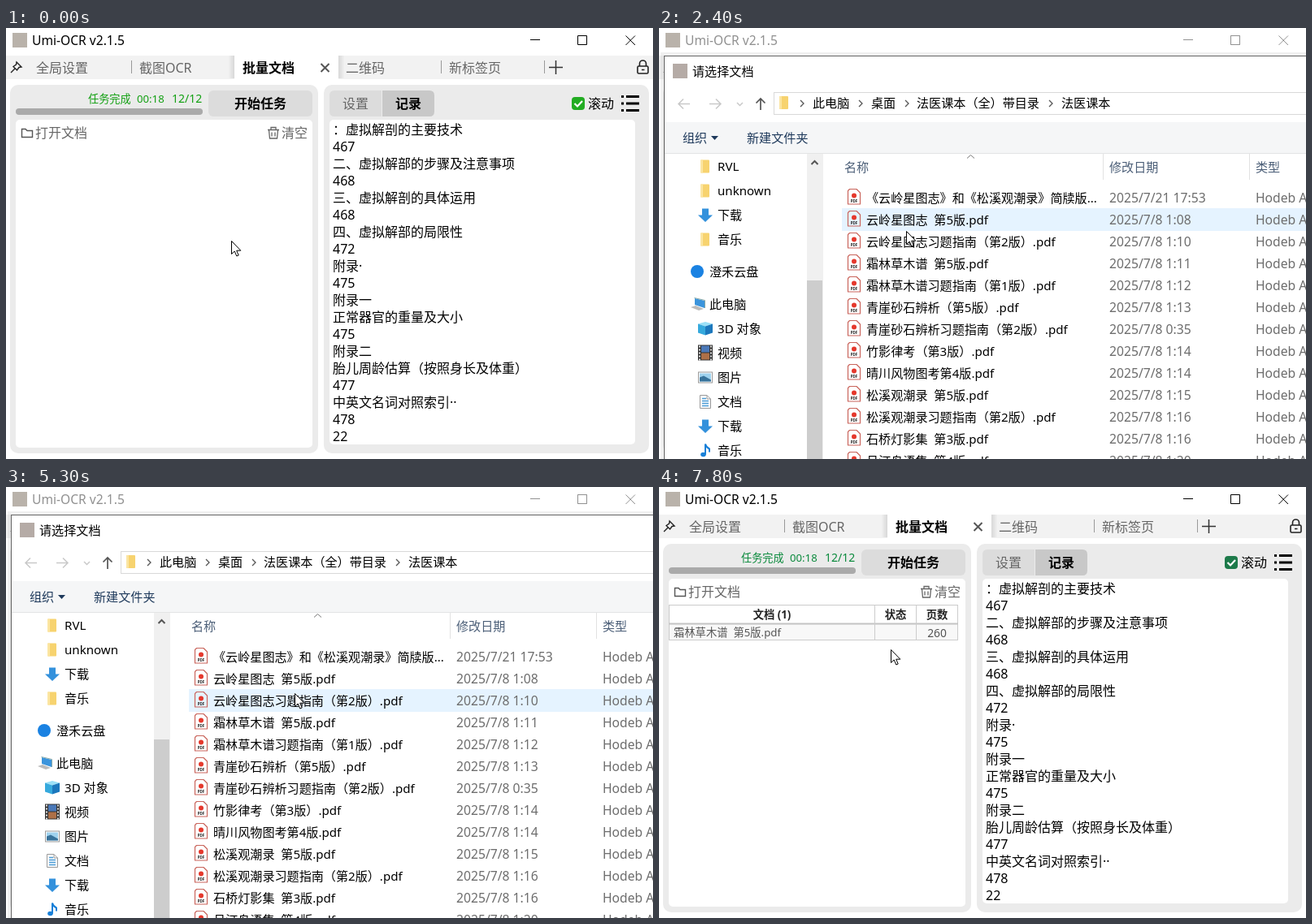
An HTML page for the animation above (8 s loop, 796x531 px).

```html
<!DOCTYPE html>
<html lang="zh-CN">
<head>
<meta charset="utf-8">
<title>批量文档</title>
<style>
html, body { margin: 0; width: 100%; height: 100%; overflow: hidden; background: #fff; }
svg { display: block; width: 796px; height: 531px; }
text { font-family: "Noto Sans", "Noto Sans CJK SC", "Noto Sans CJK", sans-serif; white-space: pre; }
</style>
</head>
<body>
<svg id="stage" viewBox="0 0 796 531" xmlns="http://www.w3.org/2000/svg"></svg>
<script>
// Markup helpers; text is placed by its vertical centre, on a whole-pixel baseline.
const text = (x, cy, str, size = 16, fill = '#000', extra = '') =>
  `<text x="${x}" y="${Math.round(cy + size * 0.37)}" font-size="${size}" fill="${fill}" ${extra}>${str}</text>`;
const rect = (x, y, w, h, fill, r = 0, extra = '') =>
  `<rect x="${x}" y="${y}" width="${w}" height="${h}" rx="${r}" fill="${fill}" ${extra}/>`;
const line = (d, color, width = 1, extra = '') =>
  `<path d="${d}" fill="none" stroke="${color}" stroke-width="${width}" ${extra}/>`;
const shape = (d, fill) => `<path d="${d}" fill="${fill}"/>`;
const group = (id, body) => `<g id="${id}">${body}</g>`;
const folder = (x, y) => rect(x, y, 11, 16, '#f7d36f', 1) + rect(x, y, 3, 16, '#fbe5a1', 1);
const BOLD = 'font-weight="700"';
const MID = 'text-anchor="middle"';

const log = ['：虚拟解剖的主要技术', '467', '二、虚拟解部的步骤及注意事项', '468', '三、虚拟解剖的具体运用', '468',
  '四、虚拟解部的局限性', '472', '附录·', '475', '附录一', '正常器官的重量及大小', '475', '附录二',
  '胎儿周龄估算（按照身长及体重）', '477', '中英文名词对照索引··', '478', '22'];

const files = [
  ['《云岭星图志》和《松溪观潮录》简牍版...', '7/21 17:53'],
  ['云岭星图志  第5版.pdf', '7/8 1:08'],
  ['云岭星图志习题指南（第2版）.pdf', '7/8 1:10'],
  ['霜林草木谱  第5版.pdf', '7/8 1:11'],
  ['霜林草木谱习题指南（第1版）.pdf', '7/8 1:12'],
  ['青崖砂石辨析（第5版）.pdf', '7/8 1:13'],
  ['青崖砂石辨析习题指南（第2版）.pdf', '7/8 0:35'],
  ['竹影律考（第3版）.pdf', '7/8 1:14'],
  ['晴川风物图考第4版.pdf', '7/8 1:14'],
  ['松溪观潮录  第5版.pdf', '7/8 1:15'],
  ['松溪观潮录习题指南（第2版）.pdf', '7/8 1:16'],
  ['石桥灯影集  第3版.pdf', '7/8 1:16'],
  ['月汀鸟语集  第4版.pdf', '7/8 1:20'],
];
const ROW = 27, FIRST_ROW = 195;

function titleBar() {
  return group('titleBar',
    text(32, 15.5, 'Umi-OCR v2.1.5', 15.6) +
    line('M645 14.5H657M703.5 9.5H714.5V20.5H703.5ZM762.5 9.5L774 21M774 9.5L762.5 21', '#000'));
}

function tabs() {
  const shade = (x, from, to) => Array.from({ length: 8 }, (_, i) =>
    rect(x + i, 34, 1, 28, '#000', 0, `opacity="${(from + (to - from) * i / 7).toFixed(3)}"`)).join('');
  return rect(0, 34, 796, 29, '#f2f2f2') +
    shade(273, 0, .1) + shade(409, .1, 0) + rect(281, 34, 128, 29, '#fff') +
    line('M154.5 40V56M535.5 40V56M662.5 40V56', '#999') +
    text(37, 49, '全局设置', 16, '#666') + text(164, 49, '截图OCR', 16, '#666') +
    text(291, 49, '批量文档', 16, '#000', BOLD) + text(418, 49, '二维码', 16, '#666') +
    text(545, 49, '新标签页', 16, '#666') +
    line('M387.5 44L397.5 54M397.5 44L387.5 54', '#555', 2) +
    line('M668 48.5H685M676.5 40V57', '#333', 1.5) +
    line('M13 42L19 48L16 48.5L13.5 52L9 47.5L12.5 45ZM11 50L6 55', '#222', 1.4) +
    rect(777, 47, 13, 9, 'none', 1.5, 'stroke="#222" stroke-width="1.6"') +
    line('M779.5 47V44A4 4 0 0 1 787.5 44V47M782 51.5H785.5', '#222', 1.6);
}

function leftPanel() {
  return rect(5, 70, 379, 454, '#ebebeb', 10) +
    group('progress', text(101, 87, '任务完成', 13.2, 'currentColor') +
      text(161, 87, '00:18', 13.2, 'currentColor') + text(204, 87, '12/12', 14, 'currentColor')) +
    rect(12, 99, 230, 8, '#aaa', 4) + rect(249, 77, 128, 32, '#dcdcdc', 6) +
    text(313, 93.5, '开始任务', 16, '#000', `${BOLD} ${MID}`) +
    rect(12, 113, 365, 404, '#fff', 5) +
    rect(14, 115, 90, 30, '#dcdcdc', 5, 'id="openHover"') +
    line('M19.5 124.5H24L26 126.5H32.5V134.5H19.5Z', '#555', 1.4) + text(36, 129.5, '打开文档', 16, '#666') +
    line('M322 125.5H336M326 125V122.5H332V125M323.5 126L324.5 136H333.5L334.5 126M327 128.5V133.5M331 128.5V133.5', '#666', 1.3) +
    text(339, 129.5, '清空', 16, '#666') +
    group('table',
      rect(12.5, 145.5, 355, 43, '#fff', 0, 'stroke="#ccc"') + rect(13, 169, 354, 19, '#f8f8f8') +
      line('M12 168.5H368', '#c4c4c4', 2) + line('M265.5 145V189M316.5 145V189', '#ccc') +
      text(139, 157.5, '文档 (1)', 13.3, '#222', `${BOLD} ${MID}`) +
      text(291, 157.5, '状态', 13.3, '#222', `${BOLD} ${MID}`) +
      text(342, 157.5, '页数', 13.3, '#222', `${BOLD} ${MID}`) +
      text(18, 179.5, '霜林草木谱  第5版.pdf', 13.3, '#555') + text(342, 179.5, '260', 13.8, '#555', MID));
}

function rightPanel() {
  return rect(391, 70, 400, 454, '#ebebeb', 10) +
    shape('M404 77H462V109H404Q398 109 398 103V83Q398 77 404 77Z', '#dcdcdc') +
    shape('M463 77H521Q527 77 527 83V103Q527 109 521 109H463Z', '#c8c8c8') +
    text(414, 93.5, '设置', 16, '#666') + text(479, 93.5, '记录', 16, '#000', BOLD) +
    rect(696, 85, 16, 16, '#22ac22', 4, 'id="check"') + line('M699.5 93L703 96.5L709 90', '#fff', 2.2) +
    text(716, 93.5, '滚动', 16) +
    line('M757 84.5H760M763 84.5H779M757 93H760M763 93H779M757 101.5H760M763 101.5H779', '#000', 3) +
    rect(398, 113, 376, 400, '#fff', 5) +
    log.map((s, i) => text(402, 125.5 + i * 20.97, s)).join('');
}

const icons = {
  folder: y => folder(51, y - 8),
  page: y => line(`M50.5 ${y - 8}H59L63.5 ${y - 3.5}V${y + 8}H50.5ZM59 ${y - 8}V${y - 3.5}H63.5`, '#999'),
  down: y => shape(`M53 ${y - 8}H61V${y}H66L57 ${y + 8.5}L48 ${y}H53Z`, '#3391dc'),
  cloud: y => `<circle cx="47" cy="${y - 1}" r="8" fill="#1a82e2"/>`,
  pc: y => shape(`M44 ${y - 7}L56 ${y - 4}V${y + 5}L44 ${y + 1}Z`, '#3b94dc') +
    line(`M43.5 ${y - 7.5}L56.5 ${y - 4.5}V${y + 5}`, '#8aa') + shape(`M39 ${y + 4}L45 ${y + 2}L55 ${y + 6}L49 ${y + 8}Z`, '#bbb'),
  cube: y => shape(`M48 ${y - 6}L57 ${y - 8.5}L66 ${y - 6}L57 ${y - 3}Z`, '#9be0f7') +
    shape(`M48 ${y - 6}L57 ${y - 3}V${y + 8}L48 ${y + 5}Z`, '#36a9dd') + shape(`M66 ${y - 6}L57 ${y - 3}V${y + 8}L66 ${y + 5}Z`, '#1c78bd'),
  film: y => rect(48, y - 10, 18, 19, '#333') + rect(52, y - 9, 10, 8, '#4a78b8') + rect(52, y, 10, 8, '#ad7048') +
    line(`M50 ${y - 9}V${y + 9}M64 ${y - 9}V${y + 9}`, '#ddd', 2, 'stroke-dasharray="2"'),
  picture: y => rect(48.5, y - 6.5, 17, 13, '#fff', 0, 'stroke="#999"') + rect(50, y - 5, 14, 10, '#9fd2ee') +
    shape(`M50 ${y + 5}V${y}L55 ${y - 2}L64 ${y + 3}V${y + 5}Z`, '#38739b'),
  doc: y => icons.page(y) + line(`M53 ${y - 4}H58M53 ${y - 1}H61M53 ${y + 2}H61M53 ${y + 5}H61`, '#4a9bd5', 1.3),
  note: y => line(`M57 ${y + 5}V${y - 8}Q58 ${y - 4} 62 ${y - 2}V${y + 2}`, '#1980d8', 2) +
    `<ellipse cx="54.5" cy="${y + 5}" rx="3.3" ry="2.7" fill="#1980d8"/>`,
};

function sidebar() {
  const places = [['RVL', 'folder'], ['unknown', 'folder'], ['下载', 'down'], ['音乐', 'folder']];
  const devices = [['3D 对象', 'cube'], ['视频', 'film'], ['图片', 'picture'], ['文档', 'doc'], ['下载', 'down'], ['音乐', 'note']];
  const label = (y, s, x = 72) => text(x, y, s, 15.1);
  const placeIcons = pick => places.map((p, i) => icons[pick(p)](170.5 + i * 30)).join('');
  return places.map(([s], i) => label(170.5 + i * 30, s)).join('') +
    group('pendingIcons', placeIcons(() => 'page')) + group('placeIcons', placeIcons(p => p[1])) +
    icons.cloud(301) + label(300.5, '澄禾云盘', 62) + icons.pc(340) + label(340.5, '此电脑', 62) +
    devices.map(([s, icon], i) => icons[icon](370.5 + i * 30) + label(370.5 + i * 30, s)).join('') +
    rect(182, 155, 20, 380, '#f0f0f0') + rect(182, 311, 19, 224, '#cdcdcd') +
    line('M187.5 168L191.5 164L195.5 168', '#555', 2);
}

function fileRow([name, date], i) {
  const y = 209.5 + i * ROW;
  return line(`M234.5 ${y - 11}H243L247.5 ${y - 6.5}V${y + 7.5}H232.5V${y - 9}Z`, '#c9655c', 1.2, 'stroke-linejoin="round"') +
    `<circle cx="240" cy="${y - 3}" r="3" fill="#e5382c"/>` + text(240, y + 4, 'PDF', 4.5, '#222', `${BOLD} ${MID}`) +
    text(255, y, name, 15.1) + text(554, y, '2025/' + date, 15.7, '#6d6d6d') + text(734, y, 'Hodeb A', 15.7, '#6d6d6d');
}

function dialog() {
  const crumbs = [[189, '此电脑'], [261, '桌面'], [317, '法医课本（全）带目录'], [495, '法医课本']];
  const chevrons = [176, 248, 305, 482].map(x => `M${x - 2} 89L${x + 2} 93L${x - 2} 97`).join('');
  return rect(4.5, 32.5, 900, 600, 'none', 0, 'stroke="#000" stroke-opacity=".06" stroke-width="5"') +
    rect(6.5, 34.5, 900, 600, '#fff', 0, 'stroke="#666"') +
    rect(17, 44, 18, 18, '#b5aba6', 0, 'id="dialogIcon"') + text(41, 53.5, '请选择文档', 15.1, '#000', 'id="dialogTitle"') +
    rect(7, 116, 900, 38, '#f5f6f7') + line('M7 154.5H900', '#e3e4e5') +
    group('navigation',
      line('M38 93.5H24M30 87.5L24 93.5L30 99.5M62 93.5H76M70 87.5L76 93.5L70 99.5M96 92L99.5 95.5L103 92', '#c9c9c9', 1.5) +
      line('M125 101V87M119.5 92.5L125 87L130.5 92.5', '#555', 1.7) +
      rect(141.5, 79.5, 700, 27, '#fff', 0, 'stroke="#d9d9d9"') + folder(148, 84) +
      line(chevrons, '#555', 1.3) + crumbs.map(([x, s]) => text(x, 92.5, s, 15.1)).join('') +
      text(29, 135, '组织', 15.1, '#1e395b') + shape('M64 133H73L68.5 138Z', '#1e395b') +
      text(108, 135, '新建文件夹', 15.1, '#1e395b')) +
    sidebar() +
    line('M546.5 155V187M726.5 155V187', '#e2e2e2') + line('M379 160.5L383.5 156.5L388 160.5', '#777') +
    text(228, 171, '名称', 15.1, '#4c5f78') + text(554, 171, '修改日期', 15.1, '#4c5f78') + text(734, 171, '类型', 15.1, '#4c5f78') +
    rect(225, 0, 580, 28, '#e5f3ff', 0, 'id="hoverRow"') +
    rect(225, FIRST_ROW + 3 * ROW, 580, 28, '#cce8ff', 0, 'id="selectedRow"') +
    files.map(fileRow).join('');
}

const stage = document.getElementById('stage');
stage.innerHTML = rect(0, 0, 796, 531, '#fff') + rect(8, 6, 18, 18, '#b9b2aa') + titleBar() + tabs() +
  leftPanel() + rightPanel() + group('dialog', dialog()) +
  group('cursor', '<path d="M.5 .5V16.5L4.2 13L6.8 19L9.2 18L6.7 12.2H11.8Z" fill="#fff" stroke="#000"/>');

const el = Object.fromEntries([...stage.querySelectorAll('[id]')].map(node => [node.id, node]));
const show = (node, on) => node.setAttribute('visibility', on ? 'visible' : 'hidden');

// Pointer path: time, x, y.
const pointerPath = [
  [0, 277, 262], [200, 283, 315], [300, 262, 342], [400, 218, 322], [500, 183, 262], [600, 176, 195],
  [700, 190, 151], [800, 210, 185], [900, 212, 234], [1100, 145, 185], [1300, 84, 138], [1400, 75, 131],
  [2000, 75, 131], [2200, 180, 200], [2400, 304, 250], [2500, 345, 298], [2700, 380, 385],
  [2900, 368, 300], [3000, 355, 260], [3100, 350, 241], [5200, 350, 241], [5300, 355, 254], [5400, 358, 287],
  [5500, 358, 287], [5700, 430, 365], [5900, 600, 495], [6000, 700, 560], [7100, 800, 560],
  [7200, 769, 495], [7400, 560, 330], [7600, 340, 220], [7800, 285, 200], [8000, 285, 200],
];

function pointerAt(t) {
  const i = pointerPath.findIndex(p => p[0] > t);
  const [t0, x0, y0] = pointerPath[i - 1], [t1, x1, y1] = pointerPath[i];
  const k = (t - t0) / (t1 - t0);
  return [x0 + (x1 - x0) * k, y0 + (y1 - y0) * k];
}

// Opacity and scale of the file dialog as it opens and closes.
function dialogPhase(t) {
  if (t < 1900 || t >= 7000) return [0, 1];
  if (t < 2000) return [0.3, 0.955];
  if (t < 2100) return [0.7, 0.984];
  return t < 6900 ? [1, 1] : [0.35, 0.975];
}

function render(t) {
  const [x, y] = pointerAt(t);
  el.cursor.setAttribute('transform', `translate(${Math.round(x)} ${Math.round(y)})`);

  const [opacity, scale] = dialogPhase(t);
  el.dialog.setAttribute('opacity', opacity);
  el.dialog.setAttribute('transform', `translate(554 345) scale(${scale}) translate(-554 -345)`);
  const loaded = t >= 2100;
  show(el.navigation, loaded);
  show(el.placeIcons, loaded);
  show(el.pendingIcons, !loaded);
  show(el.dialogIcon, t < 6800);
  el.dialogTitle.setAttribute('x', t < 6800 ? 41 : 16);

  const row = Math.floor((y - 2 - FIRST_ROW) / ROW);
  show(el.hoverRow, loaded && t < 6000 && x > 225 && row >= 0);
  el.hoverRow.setAttribute('y', FIRST_ROW + row * ROW);
  show(el.selectedRow, t >= 5600);
  el.selectedRow.setAttribute('fill', t < 6500 ? '#cce8ff' : '#d9d9d9');

  el.titleBar.setAttribute('opacity', t >= 1700 && t < 6900 ? 0.43 : 1);
  show(el.openHover, t < 1700 && x < 104 && y < 145);
  const done = t >= 7000;
  show(el.table, done);
  el.progress.setAttribute('color', done ? '#0a8a3c' : '#12a012');
  el.check.setAttribute('fill', done ? '#1d7a4a' : '#22ac22');
}

function tick() {
  render(Math.floor(performance.now() % 8000 / 100) * 100);
  requestAnimationFrame(tick);
}
tick();
</script>
</body>
</html>
```
